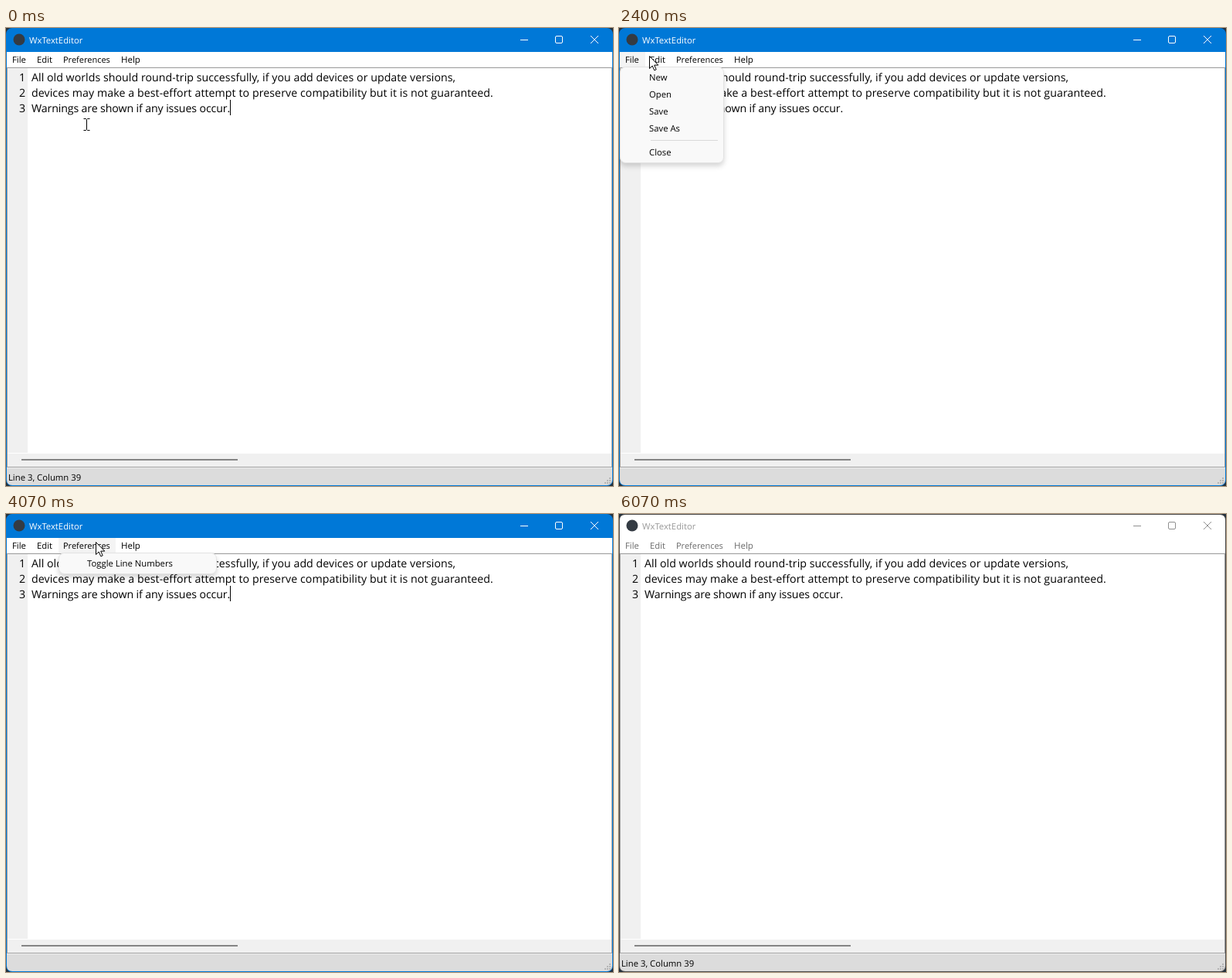
These frames come from a looping animation (786x593 px, 6190 ms). An HTML page:

```html
<!DOCTYPE html>
<html lang="en">
<head>
<meta charset="utf-8">
<title>WxTextEditor</title>
<style>
html, body { margin: 0; width: 100%; height: 100%; overflow: hidden; background: #24313d; }
svg { display: block; width: 786px; height: 593px; }
text { font: 11.3px "Open Sans", "Noto Sans", sans-serif; text-rendering: geometricPrecision; white-space: pre; fill: #000; }
.page text { font-size: 14.2px; }
.numbers { text-anchor: end; }
.frame { fill: #0078d7; }
.title { fill: #fff; }
.buttons { fill: none; stroke: #fff; }
.idle .frame { fill: #4b4b4b; }
.idle .bar { fill: #fff; }
.bar { fill: #0078d7; }
.idle .title { fill: #999; }
.idle .buttons { stroke: #8f8f8f; }
.idle .labels text { fill: #6b6b6b; }
.panel { fill: #f9f9f9; stroke: #e3e3e3; filter: drop-shadow(0 4px 3px rgba(0, 0, 0, .16)); }
.rule { stroke: #d9d9d9; }
.hot { fill: #f4f4f4; }
</style>
</head>
<body>
<svg id="app" viewBox="0 0 786 593">
  <rect class="frame" width="786" height="593" rx="8"/>
  <path class="bar" d="M1 31V8q0-7 7-7H778q7 0 7 7V31Z"/>
  <circle cx="17" cy="15" r="7.5" fill="#343b43"/>
  <text class="title" x="30" y="20">WxTextEditor</text>
  <g class="buttons">
    <path d="M666 15.5H676M757 10l10 10m0-10l-10 10"/>
    <rect x="711.5" y="10.5" width="9" height="9" rx="1.5"/>
  </g>

  <rect x="1" y="31" width="784" height="20" fill="#fff"/>
  <path d="M1 50.5H785" stroke="#f0f0f0"/>
  <rect id="hot" class="hot" y="31" height="19"/>
  <g class="labels">
    <text x="8" y="45">File</text>
    <text x="40" y="45">Edit</text>
    <text x="74" y="45" style="font-size:11px">Preferences</text>
    <text x="149" y="45" style="font-size:11.5px">Help</text>
  </g>

  <rect x="1" y="51" width="784" height="518" fill="#fff"/>
  <rect x="2" y="52" width="26" height="498" fill="#f0f0f0"/>
  <rect x="2" y="551" width="782" height="17" fill="#f0f0f0"/>
  <path d="M20 559H300" stroke="#858585" stroke-width="2"/>
  <rect x="1.5" y="51.5" width="783" height="517" fill="none" stroke="#a0a0a0"/>
  <g class="page">
    <g class="numbers">
      <text x="25" y="69">1</text><text x="25" y="89">2</text><text x="25" y="109">3</text>
    </g>
    <text x="33" y="69" letter-spacing=".03">All old worlds should round-trip successfully, if you add devices or update versions,</text>
    <text x="33" y="89" letter-spacing=".07">devices may make a best-effort attempt to preserve compatibility but it is not guaranteed.</text>
    <text x="33" y="109" letter-spacing="-.13">Warnings are shown if any issues occur.</text>
  </g>
  <rect id="caret" x="290" y="93" width="1" height="20"/>

  <path d="M1 569H785V585q0 7-7 7H8q-7 0-7-7Z" fill="#dcdcdc"/>
  <path d="M1 569.5H785" stroke="#f0f0f0"/>
  <path d="M781 583h2m-5 3h2m1 0h2m-8 3h2m1 0h2m1 0h2" stroke="#b4b4b4" stroke-width="2"/>
  <text id="status" x="3" y="586">Line 3, Column 39</text>

  <g id="menus"></g>

  <g id="pointer">
    <path id="arrow" d="M.5 .5V16.5L4.2 13 6.8 18.8 9.2 17.8 6.7 12.1H11.8Z" fill="#fff" stroke="#000"/>
    <path id="beam" d="M-3.5-7.5h3l1 1 1-1h3M.5-6.5v13M-3.5 7.5h3l1-1 1 1h3" fill="none" stroke="#000"/>
  </g>
</svg>
<script>
const LOOP = 6190;
const $ = id => document.getElementById(id);
const show = (el, on) => el.setAttribute('visibility', on ? 'visible' : 'hidden');

// Times are in ticks of 1/15 s; items are [label, baseline].
const menus = [
  { x: 1, w: 135, h: 124, tab: 33, hot: 20, open: 21, close: 37, rule: 145.5,
    items: [['New', 68], ['Open', 90], ['Save', 112], ['Save As', 134], ['Close', 165]] },
  { x: 34, w: 145, h: 146, tab: 33, hot: 37, open: 38, close: 50, rule: 101.5,
    items: [['Undo', 68], ['Redo', 90], ['Select ALl', 121], ['Copy', 143], ['Cut', 165], ['Paste', 187]] },
  { x: 68, w: 205, h: 27, tab: 74, hot: 50, open: 51, close: 91,
    items: [['Toggle Line Numbers', 68]] }
];

// Pointer stops: [tick, x, y]
const path = [
  [8, 104, 125], [14, 33, 67], [15, 33, 67], [19, 18, 40], [32, 18, 40], [36, 39, 36], [47, 39, 36],
  [51, 72, 36], [57, 72, 36], [61, 116, 36], [65, 124, 38], [71, 124, 38], [81, 140, 590]
];

function menuMarkup({ x, w, h, rule, items }) {
  const left = x + (x === 1 ? 38 : 37);
  const line = rule ? `<path class="rule" d="M${left + 2} ${rule}H${x + w - 8}"/>` : '';
  const rows = items.map(([label, y]) => `<text x="${left}" y="${y}">${label}</text>`).join('');
  return `<g><rect class="panel" x="${x + .5}" y="50.5" width="${w - 1}" height="${h}" rx="7"/>` +
    `<rect class="row" x="${x + 4}" y="54" width="${w - 8}" height="20" rx="4" fill="#efefef" visibility="hidden"/>` +
    line + rows + '</g>';
}

$('menus').innerHTML = menus.map(menuMarkup).join('');
const panels = [...$('menus').children];
const row = panels[2].querySelector('.row');

function pointerAt(tick) {
  const i = path.findIndex(stop => stop[0] > tick);
  if (i === 0) return path[0].slice(1);
  if (i < 0) return path[path.length - 1].slice(1);
  const [t0, x0, y0] = path[i - 1], [t1, x1, y1] = path[i];
  const p = (tick - t0) / (t1 - t0), e = p * p * (3 - 2 * p);
  return [x0 + (x1 - x0) * e, y0 + (y1 - y0) * e].map(Math.round);
}

function draw(tick) {
  const idle = tick >= 91;
  $('app').classList.toggle('idle', idle);
  const beat = tick % 15;
  show($('caret'), !idle && (beat < 5 || beat >= 12));
  show($('status'), tick < 21 || idle);

  menus.forEach((m, i) => {
    const on = tick >= m.open && tick < m.close;
    panels[i].setAttribute('opacity', on ? Math.min(1, (tick - m.open + 1) / 2) : 0);
  });
  const active = menus.findLast(m => tick >= m.hot && tick < 91);
  show($('hot'), active);
  if (active) {
    $('hot').setAttribute('x', active.x);
    $('hot').setAttribute('width', active.tab);
  }

  const [x, y] = pointerAt(tick), visible = tick < 82;
  $('pointer').setAttribute('transform', `translate(${x} ${y})`);
  show($('beam'), visible && tick < 16);
  show($('arrow'), visible && tick >= 16);
  show(row, visible && y > 51 && y < 78 && tick > 65);
}

let last = -1;
function step() {
  const tick = Math.floor((performance.now() % LOOP) * .015 + .06);
  if (tick !== last) draw(last = tick);
  requestAnimationFrame(step);
}
step();
</script>
</body>
</html>
```
